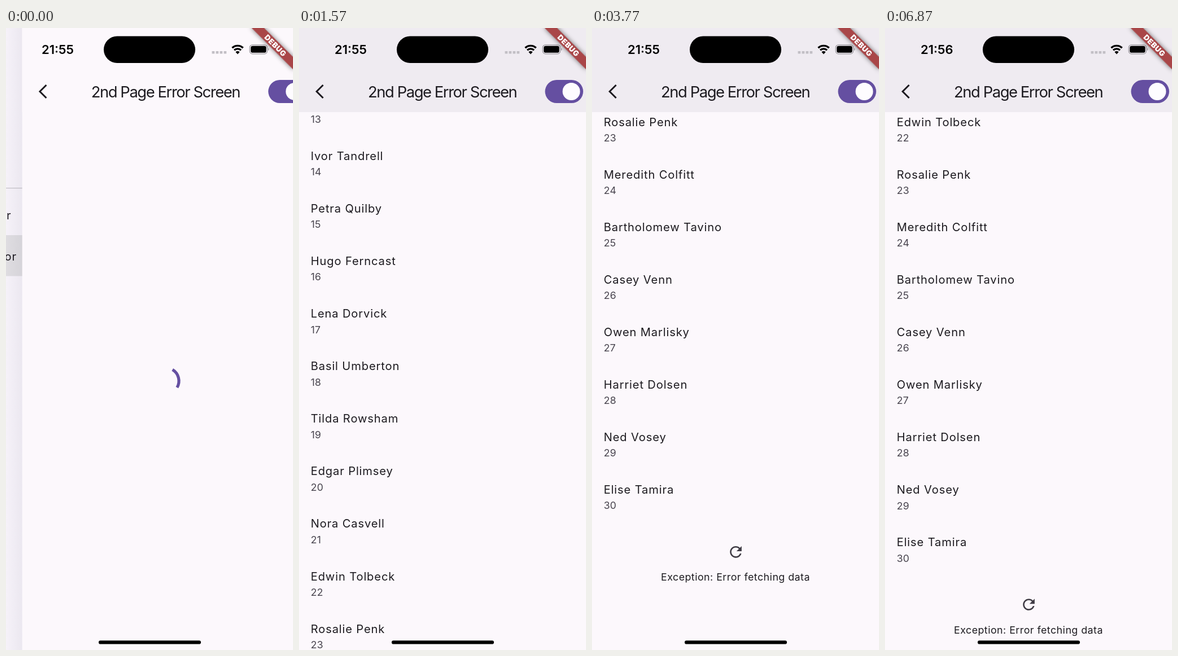
An HTML page for the animation above (6900 ms loop, 508 by 1102 pixels).

```html
<!DOCTYPE html>
<html lang="en">
<head>
<meta charset="utf-8">
<style>
html, body { margin: 0; width: 100%; height: 100%; overflow: hidden; background: #fcf8fc; }
svg { display: block; width: 508px; height: 1102px; font-family: Inter, Roboto, sans-serif; font-optical-sizing: none; fill: #1d1b20; }
.name { font-size: 20.2px; letter-spacing: .83px; }
.num { font-size: 17.8px; letter-spacing: .2px; fill: #49454f; }
.title { font-size: 27.4px; letter-spacing: -1.43px; }
.message { font-size: 17.8px; letter-spacing: .48px; }
.clock { font-size: 22px; font-weight: 600; fill: #000; }
.debug { font-size: 13.2px; font-weight: 900; letter-spacing: .5px; fill: #fff; text-anchor: middle; }
.spinner { fill: none; stroke: #654fa1; stroke-width: 5.2; }
.banner { fill: #a94648; filter: drop-shadow(0 0 4px #0008); }
</style>
</head>
<body>
<svg viewBox="0 0 508 1102">
  <defs>
    <linearGradient id="shade">
      <stop offset="0" stop-color="#202040" stop-opacity="0"/>
      <stop offset="1" stop-color="#202040" stop-opacity=".05"/>
    </linearGradient>
  </defs>

  <!-- previous page, seen at the left during the push -->
  <rect width="508" height="1102" fill="#f6f2f9"/>
  <g id="previous">
    <rect x="-20" y="283" width="80" height="1.3" fill="#c6c3c9"/>
    <rect x="-20" y="367" width="80" height="72.5" fill="#dfdde1"/>
    <text class="name" x="9.5" y="339" text-anchor="end">1st Page Error</text>
    <text class="name" x="19" y="411.5" text-anchor="end">2nd Page Error</text>
  </g>

  <g id="page">
    <rect x="-30" width="30" height="1102" fill="url(#shade)"/>
    <rect width="520" height="1102" fill="#fcf8fc"/>
    <path id="firstSpinner" class="spinner" transform="translate(254 625.3)"/>
    <g id="list">
      <g id="footer">
        <path id="footerSpinner" class="spinner" transform="translate(254 103)"/>
        <g id="error">
          <path transform="translate(239 95) scale(1.2926)" fill="#3f3b44" d="M17.65 6.35C16.2 4.9 14.21 4 12 4c-4.42 0-7.99 3.58-7.99 8s3.57 8 7.99 8c3.73 0 6.84-2.55 7.73-6h-2.08c-.82 2.33-3.04 4-5.65 4-3.31 0-6-2.69-6-6s2.69-6 6-6c1.66 0 3.14.69 4.22 1.78L13 11h7V4z"/>
          <text class="message" x="254" y="161.5" text-anchor="middle">Exception: Error fetching data</text>
        </g>
      </g>
    </g>
    <rect width="508" height="149" fill="#fcf8fc"/>
    <rect id="tint" width="508" height="149" fill="#efebf1"/>
    <path d="M42.7 101 31.2 112.5 42.7 124" fill="none" stroke="#1d1b20" stroke-width="3"/>
    <text class="title" x="122" y="123">2nd Page Error Screen</text>
    <rect x="435.5" y="92" width="67.5" height="41" rx="20.5" fill="#654fa1"/>
    <circle cx="482" cy="112.5" r="15.5" fill="#fefcff"/>
  </g>

  <!-- status bar -->
  <text id="clock" class="clock" x="63" y="46"></text>
  <rect x="173" y="14.5" width="162" height="47.5" rx="23.7" fill="#000"/>
  <path d="M364.5 43.2h26" stroke="#c2bfc5" stroke-width="4.6" stroke-dasharray="4.7 2.3"/>
  <g fill="none" stroke="#000" stroke-width="3.4">
    <path d="M400.4 35.2a14 14 0 0 1 19.2 0M404 39.2a8.8 8.8 0 0 1 12 0"/>
    <path d="M410 46.4l-3.6-3.9a5.2 5.2 0 0 1 7.2 0z" fill="#000" stroke="none"/>
  </g>
  <rect x="431.3" y="29.8" width="31.2" height="16" rx="5" fill="none" stroke="#9a979d" stroke-width="1.3"/>
  <rect x="433.2" y="31.8" width="27.4" height="12" rx="3.4" fill="#000"/>
  <path d="M464 35.3q3 2.5 0 5z" fill="#9a979d"/>
  <g transform="translate(508 0) rotate(45)">
    <rect class="banner" x="-51.7" y="36.2" width="103.4" height="15.5"/>
    <text class="debug" y="48.7">DEBUG</text>
  </g>
  <rect x="164" y="1085.3" width="181" height="6.2" rx="3.1" fill="#000"/>
</svg>

<script>
const LOOP = 6900, ROW = 93.07, TOP = 179.5;
const LOADED = 430, FAILED = 2570, HIT = 1860, RELEASE = 4670;
const FLING = 1270, FLING_FROM = 255.5;
const LOADING_END = TOP + 29 * ROW - 959;
const ERROR_END = LOADING_END + 48;

const NAMES = `Corbin Hallow,Delia Marsten,Osric Penley,Dorian Uxley,Gilbert Osmer,Marion Tovin,
Teddy Wexley,Sabrina Moltherd,Daphne Corwex,Marianne Trevosin,Clifford Vumel,Aidan Brockwend,
Simone Maltherwyn,Ivor Tandrell,Petra Quilby,Hugo Ferncast,Lena Dorvick,Basil Umberton,
Tilda Rowsham,Edgar Plimsey,Nora Casvell,Edwin Tolbeck,Rosalie Penk,Meredith Colfitt,
Bartholomew Tavino,Casey Venn,Owen Marlisky,Harriet Dolsen,Ned Vosey,Elise Tamira`.split(/,\s*/);

const $ = id => document.getElementById(id);
const clamp = x => Math.min(1, Math.max(0, x));
const show = (id, on) => $(id).style.display = on ? '' : 'none';
const move = (id, x, y) => $(id).setAttribute('transform', `translate(${x} ${y})`);

function addText(cls, y, content) {
  const el = document.createElementNS('http://www.w3.org/2000/svg', 'text');
  el.setAttribute('class', cls);
  el.setAttribute('x', 20.7);
  el.setAttribute('y', y);
  el.textContent = content;
  $('list').append(el);
}
NAMES.forEach((name, i) => {
  const y = TOP + i * ROW;
  addText('name', y + 7.2, name);
  addText('num', y + 34.6, i + 1);
});
move('footer', 0, TOP + 29 * ROW);

// cubic-bezier(.4, 0, .2, 1), solved by bisection
function easeFast(x) {
  let lo = 0, hi = 1, s = x;
  for (let i = 0; i < 20; i++) {
    s = (lo + hi) / 2;
    const bx = 1.2 * (1 - s) ** 2 * s + .6 * (1 - s) * s * s + s ** 3;
    if (bx < x) lo = s; else hi = s;
  }
  return 3 * s * s - 2 * s ** 3;
}

function drawSpinner(id, age) {
  const head = 1.5 * Math.PI * easeFast(clamp(age / 666.5));
  const tail = 1.5 * Math.PI * easeFast(clamp(age / 666.5 - 1));
  const spin = 2 * Math.PI * age / 2222 - Math.PI / 2;
  const point = a => `${23.3 * Math.cos(a)} ${23.3 * Math.sin(a)}`;
  $(id).setAttribute('d',
    `M${point(spin + tail)}A23.3 23.3 0 ${+(head - tail > Math.PI)} 1 ${point(spin + head)}`);
}

// overdamped spring with decay rates A and B per second
const A = 9.07, B = 22.04;
const kicked = s => Math.exp(-A * s) - Math.exp(-B * s);
const released = s => (B * Math.exp(-A * s) - A * Math.exp(-B * s)) / (B - A);

const PULL = [[3470, 0], [3770, 93], [3900, 112], [4170, 75], [4330, 43], [4470, 39], [RELEASE, 39]];
function pull(t) {
  if (t < PULL[0][0] || t > 5290) return 0;
  if (t >= RELEASE) return 39 * released((t - RELEASE) / 1000);
  const i = PULL.findIndex(p => p[0] > t);
  const [t0, y0] = PULL[i - 1], [t1, y1] = PULL[i];
  return y0 + (y1 - y0) * (t - t0) / (t1 - t0);
}

function scrollAt(t) {
  if (t < 1140) return 0;
  if (t < FLING) return FLING_FROM * ((t - 1140) / (FLING - 1140)) ** 1.6;
  if (t < HIT) {
    const u = (t - FLING) / (HIT - FLING);
    return FLING_FROM + (LOADING_END - FLING_FROM) * (1.14 * u - .14 * u * u);
  }
  if (t < FAILED) return LOADING_END + 59 * kicked((t - HIT) / 1000) / kicked(.07);
  return ERROR_END + pull(t);
}

function draw() {
  const t = performance.now() % LOOP;
  const x = 29 * (1 - clamp(t / 300)) ** 3;
  move('page', x, 0);
  move('previous', (x - 29) / 3, 0);
  move('list', 0, -scrollAt(t));
  show('firstSpinner', t < LOADED);
  show('list', t >= LOADED);
  show('footerSpinner', t < FAILED);
  show('error', t >= FAILED);
  drawSpinner('firstSpinner', t + 190);
  drawSpinner('footerSpinner', Math.max(0, t - 1310));
  $('tint').setAttribute('opacity', clamp((t - 1150) / 100));
  $('clock').textContent = t < 6870 ? '21:55' : '21:56';
  requestAnimationFrame(draw);
}
draw();
</script>
</body>
</html>
```
